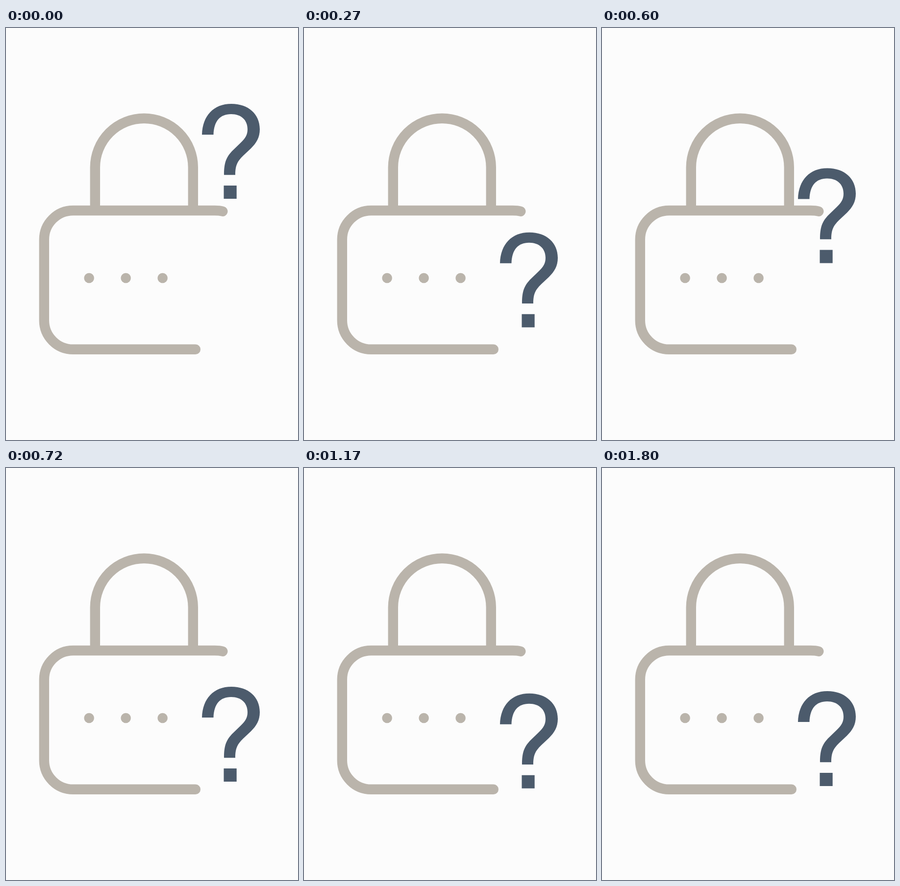
An HTML page with a canvas for the animation above (1830 ms loop, 596 px wide and 842 px high).

```html
<!DOCTYPE html>
<html lang="en">
<head>
<meta charset="utf-8">
<title>Forgotten password</title>
<style>
html, body { margin: 0; width: 100%; height: 100%; overflow: hidden; background: #fcfcfc; }
canvas { display: block; }
</style>
</head>
<body>
<canvas id="stage" width="596" height="842"></canvas>
<script>
const ctx = document.getElementById('stage').getContext('2d');
const LOOP = 1830, STEP = 30;
const GREY = '#bab4ab', BLUE = '#4c5b6c', PAPER = '#fcfcfc';

const shackle = new Path2D('M181.8 368V284.7A100 100 0 0 1 381.8 284.7V368');
const body = new Path2D('M442.3 374.8Q436 373 426 373H137A59.2 59.2 0 0 0 77.8 432.2V597.6A59.2 59.2 0 0 0 137 656.8H386.8');
// Question mark, top edge at y = 0
const mark = new Path2D(
  'M400 63C401 24 424 0 460 0C495 0 518 21 518 52C518 69 511 80 500 91' +
  'L484 106C472 118 468 126 468 145.3H445C445 121 449 109 463 95' +
  'L479 79.5C489 70 493 63 493 52C493 33 480 21 459.5 21C437 21 424.5 35 423.5 63Z' +
  'M444.5 167H470.7V194H444.5Z');

// Turning points of the bounce: time in ms, top edge of the mark
const turns = [[0, 155], [349, 454], [554, 262], [757, 463], [940, 378], [1120, 473],
  [1250, 435], [1380, 470], [1495, 454], [1635, 468], [1800, 456]];

function markTop(t) {
  let i = 1;
  while (i < turns.length - 1 && t > turns[i][0]) i++;
  const [t0, y0] = turns[i - 1], [t1, y1] = turns[i];
  const k = Math.min(1, (t - t0) / (t1 - t0));
  return y0 + (y1 - y0) * (1 - Math.cos(Math.PI * k)) / 2;
}

function drawLock() {
  ctx.strokeStyle = ctx.fillStyle = GREY;
  ctx.lineWidth = 20.4;
  ctx.lineCap = 'butt';
  ctx.stroke(shackle);
  ctx.lineCap = 'round';
  ctx.stroke(body);
  for (let i = 0; i < 3; i++) {
    ctx.beginPath();
    ctx.arc(169.6 + 75 * i, 511, 10.3, 0, 2 * Math.PI);
    ctx.fill();
  }
}

function draw(t) {
  ctx.fillStyle = PAPER;
  ctx.fillRect(0, 0, 596, 842);
  drawLock();
  ctx.save();
  ctx.translate(0, markTop(t));
  ctx.fillStyle = BLUE;
  ctx.fill(mark);
  ctx.restore();
}

const start = performance.now();
function tick() {
  const t = (performance.now() - start) % LOOP;
  draw(Math.floor(t / STEP) * STEP);
  requestAnimationFrame(tick);
}
tick();
</script>
</body>
</html>
```
